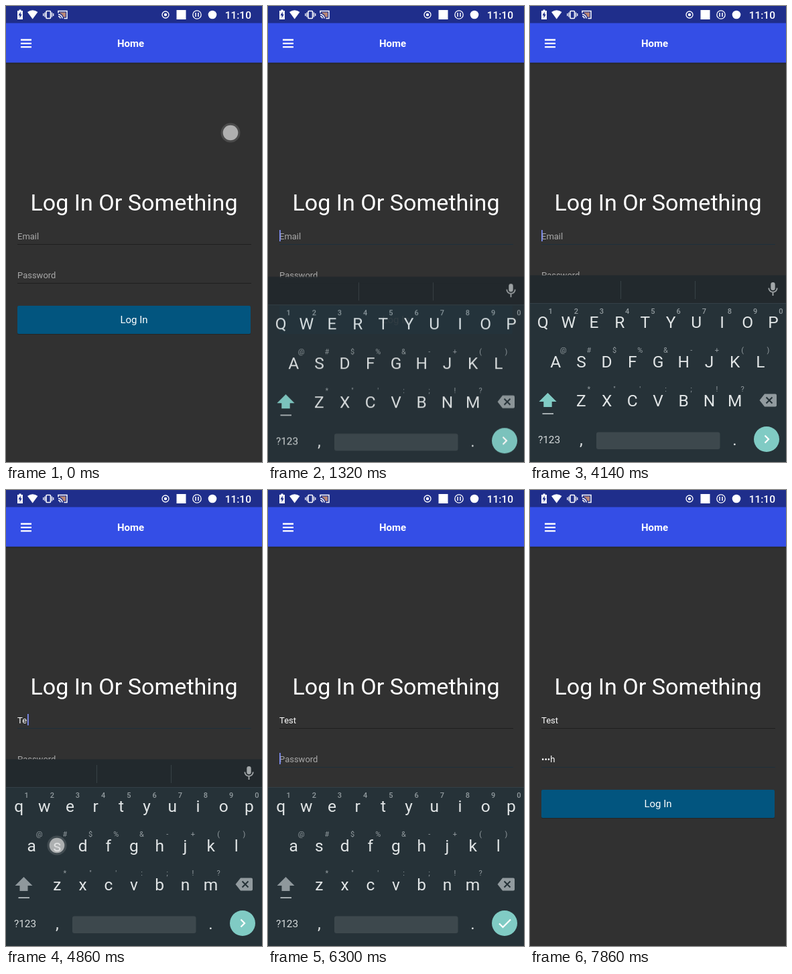
An HTML page that plays this animation: 382x680 px, repeating every 8000 ms.

```html
<!DOCTYPE html>
<html lang="en">
<head>
<meta charset="utf-8">
<title>Log in form</title>
<style>
  html, body { margin: 0; width: 100%; height: 100%; overflow: hidden; background: #313131; }
  svg { display: block; width: 382px; height: 680px; font-family: Roboto, "Noto Sans", sans-serif; }
  .page, .board, .touch { animation: 8s linear -20ms infinite; }
  .page { animation-name: pan; }
  .board { animation-name: slide; }
  .touch { animation-name: move; }
  .field { font-size: 13px; fill: #fff; }
  .field.hint { fill: #a9a9a9; }
  .key { font-size: 24.5px; fill: #e1e5e6; text-anchor: middle; }
  .alt { font-size: 11px; fill: #929b9f; text-anchor: middle; }
  .num { font-weight: 500; }
  .line { fill: none; stroke: #fff; }

  @keyframes pan {
    0%, 65.7% { transform: none; }
    66.4%, 67.9% { transform: translateY(-6px); }
    69%, 100% { transform: none; }
  }
  @keyframes slide {
    0%, 15.4% { opacity: 0; transform: translateY(46px); animation-timing-function: cubic-bezier(.2, .6, .4, 1); }
    17.4%, 93.75% { opacity: 1; transform: none; animation-timing-function: ease-in; }
    95.6%, 100% { opacity: 0; transform: translateY(46px); }
  }
  @keyframes move {
    0%, .5% { transform: translate(335px, 189px); }
    5.25% { transform: translate(328px, 300px); animation-timing-function: step-end; }
    10%, 14% { transform: translate(190px, 343px); animation-timing-function: step-end; }
    23.25% { transform: translate(326px, 300px); animation-timing-function: ease-out; }
    33% { transform: translate(319px, 145px); }
    36% { transform: translate(319px, 180px); animation-timing-function: step-end; }
    38.25% { transform: translate(322px, 280px); animation-timing-function: ease-out; }
    43.5% { transform: translate(320px, 160px); animation-timing-function: step-end; }
    56% { transform: translate(172px, 472px); animation-timing-function: step-end; }
    58.5% { transform: translate(95px, 472px); animation-timing-function: step-end; }
    60.5% { transform: translate(76px, 530px); animation-timing-function: step-end; }
    62.5% { transform: translate(172px, 472px); animation-timing-function: step-end; }
    65% { transform: translate(353px, 646px); animation-timing-function: step-end; }
    81.5% { transform: translate(172px, 472px); animation-timing-function: step-end; }
    83.5% { transform: translate(95px, 472px); animation-timing-function: step-end; }
    85.5% { transform: translate(76px, 530px); animation-timing-function: step-end; }
    87.5% { transform: translate(229px, 530px); animation-timing-function: step-end; }
    90%, 100% { transform: translate(353px, 646px); }
  }
</style>
</head>
<body>
<svg viewBox="0 0 382 680">
  <defs>
    <linearGradient id="shade" x2="0" y2="1">
      <stop stop-color="#000" stop-opacity=".3"/>
      <stop offset="1" stop-color="#000" stop-opacity="0"/>
    </linearGradient>
  </defs>
  <rect width="382" height="680" fill="#313131"/>

  <g class="page">
    <rect y="84.5" width="382" height="3" fill="url(#shade)"/>
    <rect y="20" width="382" height="64.5" fill="#344ee6"/>
    <path class="line" stroke-width="2.3" d="M22 50.5h16M22 55.8h16M22 61.1h16"/>
    <text x="166" y="61" font-size="15" font-weight="700" fill="#fff">Home</text>
    <text x="191" y="304.5" font-size="34.1" text-anchor="middle" fill="#fff">Log In Or Something</text>

    <path stroke="#1f1f1f" d="M17 355.5H366M17 413.5H366"/>
    <path stroke="#1e303b" d="M17 355.5H366" data-on="1110-5250"/>
    <path stroke="#1e303b" d="M17 413.5H366" data-on="5250-8000"/>
    <g id="fields"></g>

    <rect x="17" y="448" width="348" height="42" rx="2" fill="#252525"/>
    <rect x="17" y="447" width="348" height="42" rx="2" fill="#02557f"/>
    <text x="191" y="473" font-size="15" text-anchor="middle" fill="#fff">Log In</text>
  </g>

  <g class="board">
    <g data-on="0-5430">
      <rect y="401.5" width="382" height="42" fill="#22292d"/>
      <path stroke="#384145" d="M135.5 410v27M246.5 410v27"/>
      <rect x="359.3" y="412" width="6.4" height="12" rx="3.2" fill="#a3a8aa"/>
      <path fill="none" stroke="#a3a8aa" stroke-width="1.8" d="M356.3 420.5a6.2 6.2 0 0 0 12.4 0M362.5 427v5"/>
    </g>
    <rect y="443" width="382" height="240" fill="#263238"/>
    <path stroke="#344047" d="M0 443.5H382"/>
    <g id="alts"></g>
    <g id="upper" data-on="0-4600"></g>
    <g id="lower" data-on="4600-8000"></g>

    <path fill="#8f989c" d="M26.5 577l13 13h-7v8h-12v-8h-7z"/>
    <path fill="#80cbc4" d="M26.5 577l13 13h-7v8h-12v-8h-7z" data-on="0-4600"/>
    <path stroke="#a5adb0" stroke-width="2" d="M18.5 608H35"/>
    <path fill="#929b9f" d="M350 578.5h16q2 0 2 2v15q0 2-2 2h-16l-7.5-9.5z"/>
    <path stroke="#263238" stroke-width="2" d="M352.5 583.5l9 9M361.500 583.5l-9 9"/>

    <text x="28.5" y="652" font-size="15.4" text-anchor="middle" fill="#d5dadb">?123</text>
    <text class="key" x="76.5" y="654.5">,</text>
    <rect x="99" y="635.5" width="184.5" height="25.5" rx="3" fill="#3d484d"/>
    <text class="key" x="305.5" y="654.5">.</text>
    <circle cx="353" cy="646" r="19" fill="#80cbc4"/>
    <path class="line" stroke-width="2.2" d="M350.5 640.5l5.5 5.5-5.5 5.5" data-on="0-5430"/>
    <path class="line" stroke-width="2.2" d="M345 646.5l5.5 5.5 11.5-11.5" data-on="5430-8000"/>
  </g>

  <g id="status">
    <rect width="382" height="25.5" fill="#1f2e8b"/>
    <path fill="#fff" d="M19.5 5.5h3v1.5h2.5v13h-8v-13h2.5z"/>
    <path fill="#1f2e8b" d="M21.8 8.5l-3.3 5.5h2v4l3.3-5.5h-2z"/>
    <path fill="#fff" d="M32 9q7.7-5.6 15.4 0l-7.7 10.5z"/>
    <rect class="line" x="60" y="7.5" width="6.5" height="11" rx="1" stroke-width="1.6"/>
    <path class="line" stroke-width="1.3" d="M58 9.5v7M55.8 11v4M68.5 9.5v7M70.7 11v4"/>
    <path class="line" stroke-width="1.5" d="M78 10.5v-3h13v11h-4.5M78 12.5a6 6 0 0 1 6 6M78 15.5a3 3 0 0 1 3 3"/>
    <path fill="#b98774" d="M80.5 9.5h8.5v7h-3.3q-1.2-4.8-5.2-5.8z"/>
    <circle class="line" cx="238" cy="13" r="5" stroke-width="1.3"/>
    <circle cx="238" cy="13" r="2.2" fill="#fff"/>
    <rect x="254.5" y="6" width="14" height="14" fill="#fff"/>
    <circle class="line" cx="285" cy="13" r="6.2" stroke-width="1.3"/>
    <path class="line" stroke-width="1.5" d="M283 10v6M287 10v6"/>
    <circle cx="308" cy="13" r="6.3" fill="#fff"/>
    <text x="366" y="19" font-size="15.5" font-weight="500" text-anchor="end" fill="#fff">11:10</text>
  </g>

  <g data-on="0-420 840-1080 1860-2880 3060-3480 4500-4620 4690-4790 4850-4950 5010-5100 5220-5400 6530-6630 6690-6780 6850-6940 7010-7110 7250-7420">
    <g class="touch">
      <circle r="14.5" fill="#fff" opacity=".13"/>
      <circle r="11.3" fill="#dcdcdc" opacity=".7"/>
    </g>
  </g>
</svg>
<script>
  const LOOP = 8000;
  const byId = id => document.getElementById(id);

  function add(parent, tag, attrs, text = '') {
    const el = document.createElementNS('http://www.w3.org/2000/svg', tag);
    for (const name in attrs) el.setAttribute(name, attrs[name]);
    el.textContent = text;
    return parent.appendChild(el);
  }

  // Keyboard: labels, hints, first key centre, baseline
  const rows = [
    ['QWERTYUIOP', '1234567890', 19.1, 480.3],
    ['ASDFGHJKL', '@#$%&-+()', 38.2, 538.5],
    ['ZXCVBNM', '*"\':;!?', 76.4, 596.7]
  ];
  rows.forEach(([keys, alts, left, y], r) => {
    [...keys].forEach((key, i) => {
      const x = left + i * 38.2;
      add(byId('upper'), 'text', { class: 'key', x, y }, key);
      add(byId('lower'), 'text', { class: 'key', x, y }, key.toLowerCase());
      add(byId('alts'), 'text', { class: r ? 'alt' : 'alt num', x: x + 11.5, y: y - 21.3 }, alts[i]);
    });
  });

  // Typed states: text, caret x, start, end, caret times
  const fields = [
    [348, [
      ['Email', 17, 0, 4600, '1110-1610 2110-2610 3110-3610 4110-4600'],
      ['T', 25, 4600, 4780],
      ['Te', 32, 4780, 4930],
      ['Tes', 38, 4930, 5090],
      ['Test', 42, 5090, LOOP, '5090-5250']
    ]],
    [406, [
      ['Password', 17, 0, 6610, '5250-5750 6250-6610'],
      ['t', 21.5, 6610, 6770],
      ['•e', 29, 6770, 6930],
      ['••s', 33, 6930, 7090],
      ['•••h', 38, 7090, LOOP, '7090-7590']
    ]]
  ];
  for (const [y, states] of fields) {
    states.forEach(([text, x, from, to, caret], i) => {
      const on = `${from}-${to}`;
      add(byId('fields'), 'text', { class: i ? 'field' : 'field hint', x: 17, y, 'data-on': on }, text);
      add(byId('fields'), 'rect', {
        x, y: y - 14, width: 1.8, height: 17, fill: '#7d8cf0', 'data-on': caret || on
      });
    });
  }

  // Hard on/off switching from "from-to" times, one keyframe per offset
  for (const el of document.querySelectorAll('[data-on]')) {
    const steps = new Map([[0, 0]]);
    for (const span of el.dataset.on.split(' ')) {
      const [from, to] = span.split('-');
      steps.set(from / LOOP, 1).set(to / LOOP, 0);
    }
    steps.set(1, 0);
    const frames = [...steps].map(([offset, opacity]) => ({ offset, opacity, easing: 'step-end' }));
    el.animate(frames, { duration: LOOP, delay: -20, iterations: Infinity });
  }
</script>
</body>
</html>
```
